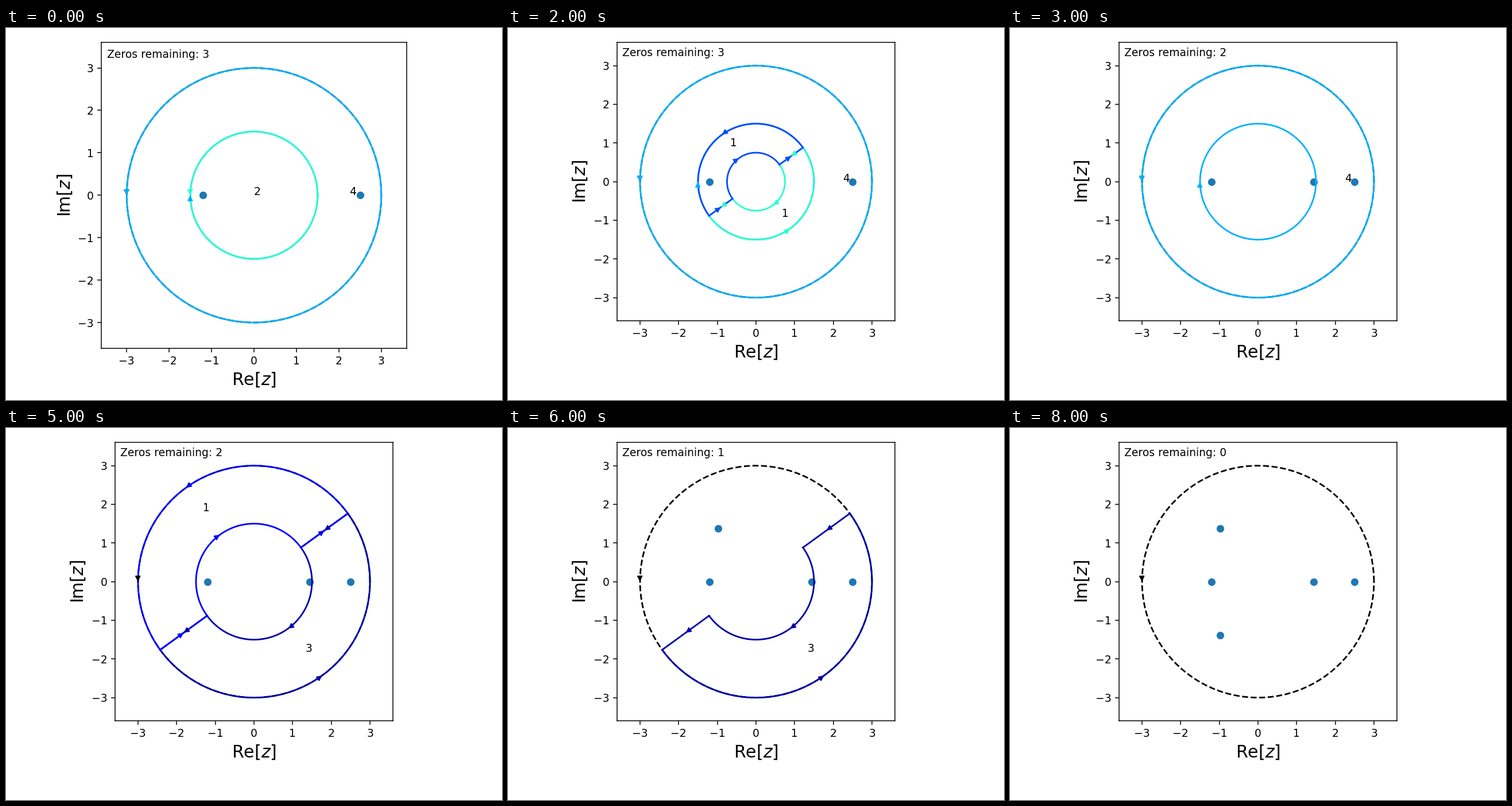
Write a matplotlib script that moves like this. It is 864 px wide and 648 px high and loops after 10000 ms.

```python
import matplotlib as mpl
import matplotlib.pyplot as plt
import numpy as np
from matplotlib.animation import FuncAnimation

W, H, DPI = 864, 648, 135
PI = np.pi
TILT = 0.2 * PI
JET = mpl.colormaps["jet"]

fig = plt.figure(figsize=(W / DPI, H / DPI), dpi=DPI, facecolor="white")
ax = fig.add_axes([0, 0, 1, 1])


def arc(r, a, b):
    return lambda t: r * np.exp(1j * (a + (b - a) * t))


def line(p, q):
    return lambda t: p + (q - p) * t


def circle(r):
    return 0, [arc(r, 0, 2 * PI)]


def annulus(r, R):
    return (r + R) / 2, [arc(R, 0, 2 * PI), arc(r, 2 * PI, 0)]


def sector(r, R, a):
    """Half of an annulus, starting at angle a."""
    b = a + PI
    u, v = np.exp(1j * a), np.exp(1j * b)
    sides = [line(r * u, R * u), arc(R, a, b), line(R * v, r * v), arc(r, b, a)]
    return (r + R) / 2 * np.exp(1j * (a + b) / 2), sides


def draw_path(path, color, style="-"):
    z = path(np.linspace(0, 1, 100))
    ax.plot(z.real, z.imag, color=color, ls=style, lw=1.5)
    mid, step = path(0.5), path(0.51) - path(0.5)
    tip = mid + 1e-6 * step / abs(step)
    ax.annotate("", xy=(tip.real, tip.imag), xytext=(mid.real, mid.imag),
                arrowprops=dict(arrowstyle="-|>", fc=color, ec=color))


def draw_box(shape, count, shade):
    center, paths = shape
    ax.text(np.real(center), np.imag(center), count)
    for path in paths:
        draw_path(path, JET(shade))


# Each box: contour, zeros inside, position in the colour map
OUTER = (annulus(1.5, 3), 4, 0.298)
LOWER = (sector(1.5, 3, PI + TILT), 3, 0.037)
ROOTS = [-1.2, 2.5, 1.44025, -0.97465 + 1.38105j, -0.97465 - 1.38105j]

# Each step: roots found, zeros remaining, boxes still to search
STEPS = [
    (2, 3, [OUTER, (circle(1.5), 2, 0.4)]),
    (2, 3, [OUTER, (annulus(0.75, 1.5), 2, 0.83)]),
    (2, 3, [OUTER, (sector(0.75, 1.5, PI + TILT), 1, 0.4),
            (sector(0.75, 1.5, TILT), 1, 0.2)]),
    (3, 2, [OUTER]),
    (3, 2, [(sector(1.5, 3, PI), 2, 0.4), (sector(1.5, 3, 0), 2, 0.2)]),
    (3, 2, [LOWER, (sector(1.5, 3, TILT), 1, 0.118)]),
    (4, 1, [LOWER]),
    (4, 1, [(sector(1.5, 2.25, PI + TILT), 1, 0.4),
            (sector(2.25, 3, PI + TILT), 2, 0.118)]),
    (5, 0, []),
    (5, 0, []),
]


def update(i):
    found, remaining, boxes = STEPS[i]
    ax.clear()
    side = 532.3 if i == 0 else 484.9
    ax.set_position([(W - side) / 2 / W, (H - 25.2 - side) / H, side / W, side / H])

    draw_path(arc(3, 0, 2 * PI), "k", "--")
    for box in boxes:
        draw_box(*box)
    roots = np.array(ROOTS[:found])
    ax.scatter(roots.real, roots.imag, color="C0")

    ax.text(0.02, 0.95, f"Zeros remaining: {remaining}", transform=ax.transAxes)
    ax.set(xlim=(-3.6, 3.6), ylim=(-3.6, 3.6),
           xticks=range(-3, 4), yticks=range(-3, 4))
    ax.set_xlabel("Re[$z$]", size=16)
    ax.set_ylabel("Im[$z$]", size=16)
    return []


anim = FuncAnimation(fig, update, frames=len(STEPS), init_func=lambda: [],
                     interval=1000, repeat=True, repeat_delay=0)
plt.show()
```
